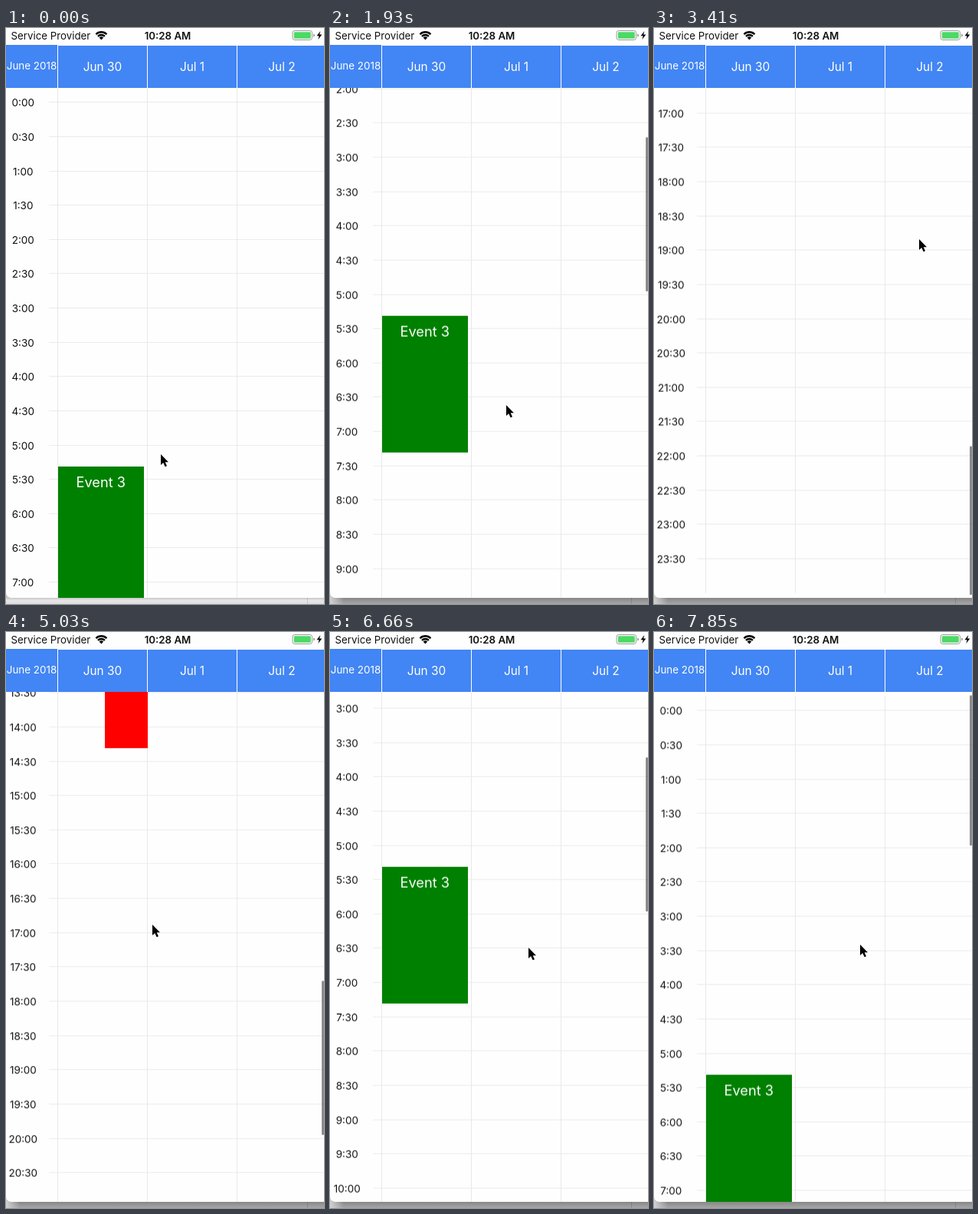
Animation of 415x750 px, one loop 8 s. Source, as an HTML page:

```html
<!DOCTYPE html>
<html lang="en">
<head>
<meta charset="utf-8">
<title>Week view</title>
<style>
  html, body { margin: 0; width: 100%; height: 100%; overflow: hidden; background: #e4e4e4; }
  body { font-family: Inter, Roboto, sans-serif; color: #111; }
  #stage, #stage div { position: absolute; }
  #stage { width: 415px; height: 750px; overflow: hidden; }
  #shadow { inset: 734px 0 0 0; background: linear-gradient(#c6c6c6 50%, #e6e6e6 70%, #dedede); }
  #shadow.focused { background: linear-gradient(90deg, #d2d2d2, #d2d2d200 18px), linear-gradient(#858585 45%, #8d8d8d 60%, #a6a6a6); }
  #shadow::after { content: ""; position: absolute; left: 393px; top: 8px; width: 1px; height: 8px; background: #0002; }
  #screen { inset: 0 0 8px 0; background: #fefefe; border-bottom-left-radius: 7px; overflow: hidden; }
  #view { inset: 78px 0 0 0; overflow: hidden; }
  #content { left: 0; top: -78px; width: 415px; height: 2239px; will-change: transform; }
  .hour { left: 56px; right: 0; height: 1px; background: #ebebeb; }
  .label { left: 0; width: 44.6px; font-size: 13.5px; line-height: 20px; text-align: center; }
  .col { top: 78px; bottom: 0; width: 1px; background: #e9e9e9; }
  .event { color: #fff; font-size: 18.2px; line-height: 22.3px; text-align: center; padding-top: 9.5px; box-sizing: border-box; }
  #bar { left: 412px; top: 0; width: 2.5px; border-radius: 2px; background: #00000073; }
  .head { top: 23px; height: 55px; line-height: 55px; background: #4285f4; color: #fff; font-size: 15.4px; text-align: center; white-space: nowrap; }
  .head + .head { border-left: 1px solid #fff; }
  .status { top: 0; line-height: 20px; font-size: 13.3px; white-space: nowrap; }
  svg { position: absolute; left: 0; top: 0; overflow: visible; }
</style>
</head>
<body>
<div id="stage">
  <div id="shadow"></div>
  <div id="screen">
    <div id="view">
      <div id="content"></div>
    </div>
    <div id="bar"></div>
    <div id="header">
      <div class="head" style="left:0;top:22px;height:56px;width:67px;font-size:13.4px">June 2018</div>
      <div class="head" style="left:67px;width:116px">Jun 30</div>
      <div class="head" style="left:184px;width:116px">Jul 1</div>
      <div class="head" style="left:301px;width:116px">Jul 2</div>
    </div>
    <div class="status" style="left:6.5px">Service Provider</div>
    <div class="status" style="left:111px;width:200px;text-align:center;font-weight:600">10:28 AM</div>
    <svg width="415" height="23">
      <g fill="none" stroke="#000" stroke-width="2.3">
        <path d="M117.4 8.2a9.8 9.8 0 0 1 14 0M119.9 10.9a6.3 6.3 0 0 1 9 0"/>
      </g>
      <path d="M121.6 12.6a4 4 0 0 1 5.6 0L124.4 15.5z"/>
      <rect x="374" y="3.5" width="25.5" height="12" rx="2.8" fill="none" stroke="#999"/>
      <rect x="375.8" y="5.2" width="22" height="8.6" rx="1.3" fill="#4cd964"/>
      <path d="M401 7.6q2 .6 2 2t-2 2z" fill="#999"/>
      <path d="M410.3 4l-4.8 6.2h3.1l-1.3 4.8 5-6.4h-3.2z"/>
    </svg>
  </div>
  <svg id="cursor" width="12" height="18">
    <path d="M0 0V14L3.2 11 5.6 16.2 8 15.2 5.7 10.2H10Z" stroke="#fff" stroke-width="1.6" paint-order="stroke" stroke-linejoin="round"/>
  </svg>
</div>
<script>
  const LOOP = 8000, TICK = 148.04, ROW = 44.63;
  const MAX_SCROLL = 1496.5, TRACK_TOP = 82.3, THUMB = 201, THUMB_RATE = 0.304;
  const $ = id => document.getElementById(id);

  function add(className, style, text = '') {
    const el = document.createElement('div');
    el.className = className;
    el.style.cssText = style;
    el.textContent = text;
    $('content').append(el);
  }

  for (let i = 0; i < 48; i++) {
    const y = 96.3 + i * ROW;
    add('hour', `top:${y}px`);
    add('label', `top:${y - 9}px`, `${i >> 1}:${i % 2 ? '30' : '00'}`);
  }
  for (const x of [67, 184, 301]) add('col', `left:${x}px`);

  const addEvent = (x, y, w, rows, color, text) =>
    add('event', `left:${x}px;top:${y}px;width:${w}px;height:${rows * ROW}px;background:${color}`, text);
  addEvent(68, 570.8, 111.5, 4, '#008000', 'Event 3');
  addEvent(68, 1016.8, 56, 4, '#00f', 'Event 1');
  addEvent(129, 1106, 56, 6, '#f00', 'Event 2');

  // Keys are [tick, value, ...]
  const scrollKeys = [
    [4, 0], [6, 55], [8, 112], [11, 196.3], [12, 229], [13, 290], [16, 700], [18, 1090],
    [20, 1470], [21, 1503.5], [22, 1498], [23, MAX_SCROLL], [28, MAX_SCROLL], [30, 1405],
    [32, 1222.8], [36, 900], [39, 684], [43, 265.3], [44, 214], [47, 65], [49, -12], [51, -5.5]
  ];
  const cursorKeys = [
    [2, 202, 555], [3, 202, 556], [4, 202, 556], [7, 214, 500], [9, 224, 515], [11, 230, 491],
    [14, 242, 380], [16, 264, 430], [18, 300, 320], [21, 346, 275], [27, 182, 200], [28, 182, 200],
    [32, 191, 381], [34, 212, 440], [36, 240, 380], [39, 259, 440], [41, 260, 450], [43, 259, 411],
    [46, 264, 450], [51, 269, 407]
  ];

  const slope = (a, b, n) => (b[n] - a[n]) / (b[0] - a[0]);

  // Tangent that never overshoots a turning point
  function tangent(keys, i, n) {
    if (i < 1 || i > keys.length - 2) return 0;
    const a = slope(keys[i - 1], keys[i], n), b = slope(keys[i], keys[i + 1], n);
    return a * b > 0 ? 2 * a * b / (a + b) : 0;
  }

  function at(keys, k, n = 1) {
    const i = keys.findIndex(key => key[0] >= k);
    if (i < 0) return keys[keys.length - 1][n];
    if (i === 0) return keys[0][n];
    const a = keys[i - 1], b = keys[i], d = b[0] - a[0], u = (k - a[0]) / d, v = 1 - u;
    return v * v * (1 + 2 * u) * a[n] + u * u * (3 - 2 * u) * b[n]
      + d * u * v * (v * tangent(keys, i - 1, n) - u * tangent(keys, i, n));
  }

  const barKeys = [[4, 0], [5, 1], [24, 1], [27, 0], [28, 0], [29, 1]];

  function draw(t) {
    const k = Math.max(0, Math.floor((t - 286) / TICK));
    const scroll = at(scrollKeys, k);
    const inside = Math.min(MAX_SCROLL, Math.max(0, scroll));
    const over = scroll - inside;
    $('content').style.transform = `translateY(${-scroll}px)`;
    $('bar').style.transform = `translateY(${TRACK_TOP + inside * THUMB_RATE + Math.max(0, over)}px)`;
    $('bar').style.height = THUMB - Math.abs(over) + 'px';
    $('bar').style.opacity = at(barKeys, k);
    $('cursor').style.transform = `translate(${at(cursorKeys, k, 1)}px, ${at(cursorKeys, k, 2)}px)`;
    $('shadow').className = t >= 300 ? 'focused' : '';
  }

  let start;
  function frame(now) {
    start ??= now;
    draw((now - start) % LOOP);
    requestAnimationFrame(frame);
  }
  draw(0);
  requestAnimationFrame(frame);
</script>
</body>
</html>
```
